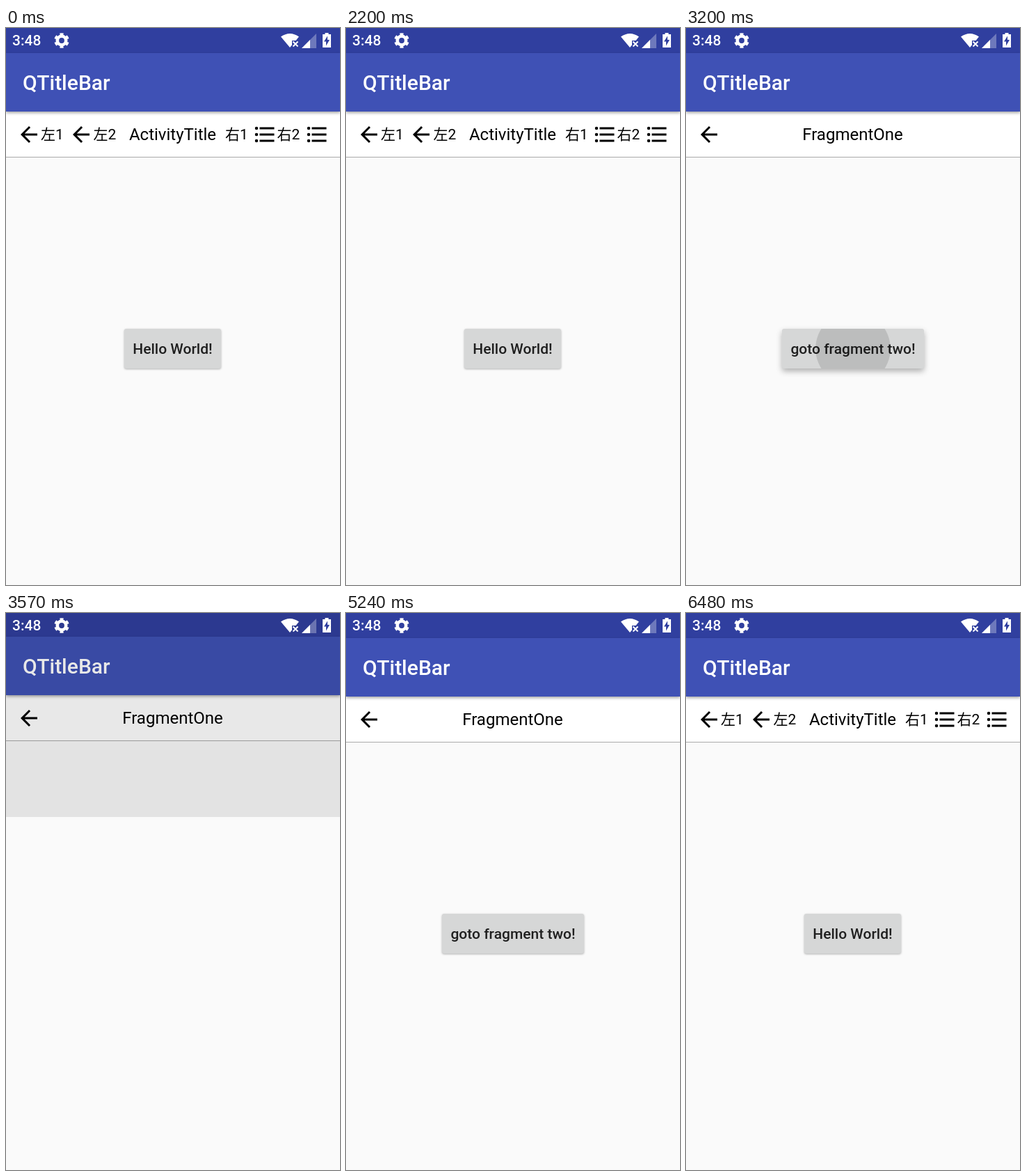
These frames come from a looping animation (480x800 px, 6.69 s). An HTML page:

```html
<!DOCTYPE html>
<html lang="zh-CN">
<head>
<meta charset="utf-8">
<title>QTitleBar</title>
<style>
html, body { margin: 0; width: 100%; height: 100%; overflow: hidden; background: #000; }
body { font-family: Roboto, "Noto Sans CJK SC", "Noto Sans CJK JP", sans-serif; white-space: nowrap; }
#stage { position: relative; width: 480px; height: 800px; overflow: hidden; }
#stage div, svg { position: absolute; }
.screen { inset: 0; background: #fafafa; }
.status { left: 0; top: 0; width: 480px; height: 36px; background: #303f9f; }
.bar { left: 0; top: 36px; width: 480px; height: 84px; z-index: 1; background: #3f51b5; color: #fff;
  box-shadow: 0 2px 4px rgba(0, 0, 0, .35); font: 500 30px/86px Roboto, sans-serif; text-indent: 24px; }
.head { left: 0; top: 120px; width: 480px; height: 65px; line-height: 66px; font-size: 21px; color: #000;
  background: #fff; border-bottom: 1px solid #aaa; }
.title { left: 0; width: 479px; text-align: center; font-size: 24px; }
.button { top: 432px; height: 57px; line-height: 59px; border-radius: 3px; text-align: center;
  font-size: 21px; font-weight: 500; color: #1f1f1f; background: #d6d7d7; --z: 0; --r: 0; --o: 0;
  box-shadow: 0 calc(1px + 3px * var(--z)) calc(3px + 6px * var(--z)) rgba(0, 0, 0, .3); }
.button::before { content: ""; position: absolute; inset: 0; border-radius: 3px; background: #000;
  opacity: calc(.12 * var(--o)); clip-path: circle(calc(110px * var(--r))); }
.note { left: 0; top: 186px; width: 479px; line-height: 33px; text-align: center; font-size: 21px; color: #737373; }
#clock { left: 9px; top: 0; font-size: 21px; font-weight: 500; line-height: 37px; color: #fff; }
</style>
</head>
<body>
<div id="stage">
  <svg width="0" height="0">
    <symbol id="back" viewBox="0 0 24 24"><path d="M20 11H7.83l5.59-5.59L12 4l-8 8 8 8 1.41-1.41L7.83 13H20z"/></symbol>
    <symbol id="list" viewBox="0 0 24 24">
      <path d="M7 5h14v2H7zM7 11h14v2H7zM7 17h14v2H7z"/>
      <circle cx="4" cy="6" r="1.5"/><circle cx="4" cy="12" r="1.5"/><circle cx="4" cy="18" r="1.5"/>
    </symbol>
  </svg>
  <div id="top">
    <div id="clock">3:48</div>
    <svg width="480" height="36" fill="#fff">
      <g fill="none" stroke="#fff" transform="translate(80 18)">
        <circle r="6.2" stroke-width="4.6"/>
        <circle r="9" stroke-width="3.6" pathLength="60" stroke-dasharray="5.2 4.8" stroke-dashoffset="-2.4"/>
      </g>
      <path d="M408 28L395 12.5Q408 3.5 421 12.5L416.5 18H411V24.5z"/>
      <path d="M412.5 19.5l7 7m0-7l-7 7" stroke="#fff" stroke-width="1.9"/>
      <path d="M446 8V29H425z" opacity=".3"/>
      <path d="M437 17V29H425z"/>
      <path d="M458.5 7h5v2h3.5v19h-12V9h3.5z"/>
      <path d="M462 11.5v5.5h3l-5 8.5v-6h-3z" fill="#303f9f"/>
    </svg>
  </div>
</div>
<script>
const LOOP = 6690, SLIDE = 425;
const stage = document.getElementById('stage'), overlay = document.getElementById('top');

const icon = (id, x) => `<svg style="left:${x}px;top:15px" width="36" height="36"><use href="#${id}"/></svg>`;
const label = (text, x) => `<div style="left:${x}px">${text}</div>`;
const button = (text, x, w) => `<div class="button" style="left:${x}px;width:${w}px">${text}</div>`;

function addScreen(title, items, content) {
  const el = document.createElement('div');
  el.className = 'screen';
  el.innerHTML = `<div class="status"></div><div class="bar">QTitleBar</div>
    <div class="head"><div class="title">${title}</div>${items}</div>${content}`;
  stage.insertBefore(el, overlay);
  return el;
}

const screens = [
  { open: -1e4, close: 1e5, press: 1490, release: 1900,
    el: addScreen('ActivityTitle',
      icon('back', 15) + label('左1', 50) + icon('back', 90) + label('左2', 125.5) +
      label('右1', 315) + icon('list', 354) + label('右2', 389.5) + icon('list', 429),
      button('Hello World!', 170, 139)) },
  { open: 2227, close: 5455, press: 3080, release: 3370,
    el: addScreen('FragmentOne', icon('back', 15), button('goto fragment two!', 138, 204)) },
  { open: 3484, close: 4785.5,
    el: addScreen('FragmentTwo', icon('back', 15), '<div class="note">Hello fragment two!</div>') }
];

const clamp = v => Math.min(1, Math.max(0, v));
const cubic = (a, b, c, d, s) => {
  const r = 1 - s;
  return a * r * r * r + 3 * b * s * r * r + 3 * c * s * s * r + d * s * s * s;
};

// y of a Bezier segment at a given x, found by bisection
function curve(x, [x0, y0, x1, y1, x2, y2, x3, y3]) {
  let lo = 0, hi = 1;
  for (let i = 0; i < 24; i++) {
    const mid = (lo + hi) / 2;
    if (cubic(x0, x1, x2, x3, mid) < x) lo = mid; else hi = mid;
  }
  return cubic(y0, y1, y2, y3, lo);
}
const ease = x => x <= 0 ? 0 : x >= 1 ? 1 : curve(x, [0, 0, .4, 0, .2, 1, 1, 1]);
const easeFast = x => x <= 0 ? 0 : x >= 1 ? 1 : x < 1 / 6
  ? curve(x, [0, 0, .05, 0, .13333, .06, 1 / 6, .4])
  : curve(x, [1 / 6, .4, .20833, .82, .25, 1, 1, 1]);

function pose(screen, t) {
  const a = clamp((t - screen.open) / SLIDE), b = clamp((t - screen.close) / SLIDE);
  return {
    shown: a > 0 && b < 1,
    shift: ease(a) - ease(b),
    reveal: easeFast(a) - easeFast(b),
    dim: clamp((t - screen.open) / 90) - b ** 1.5
  };
}

function draw(t) {
  const poses = screens.map(s => pose(s, t));
  screens.forEach(({ el, press, release }, i) => {
    const own = poses[i], above = poses[i + 1] || { shift: 0, dim: 0 };
    const y = Math.round(32.8 * (1 - own.shift)) - Math.round(16 * above.shift);
    el.style.visibility = own.shown ? 'visible' : 'hidden';
    el.style.transform = `translateY(${y}px)`;
    el.style.clipPath = `inset(${Math.round(767.2 * (1 - own.reveal))}px 0 0 0)`;
    el.style.filter = above.dim > 0 ? `brightness(${1 - .095 * above.dim})` : 'none';
    if (!press) return;
    const style = el.querySelector('.button').style;
    const up = clamp((t - release) / 200);
    style.setProperty('--z', clamp((t - press) / 100) - up);
    style.setProperty('--r', ease((t - press) / 350));
    style.setProperty('--o', clamp((t - press) / 80) - up);
  });
}

const start = performance.now();
function tick() {
  draw((performance.now() - start) % LOOP);
  requestAnimationFrame(tick);
}
tick();
</script>
</body>
</html>
```
